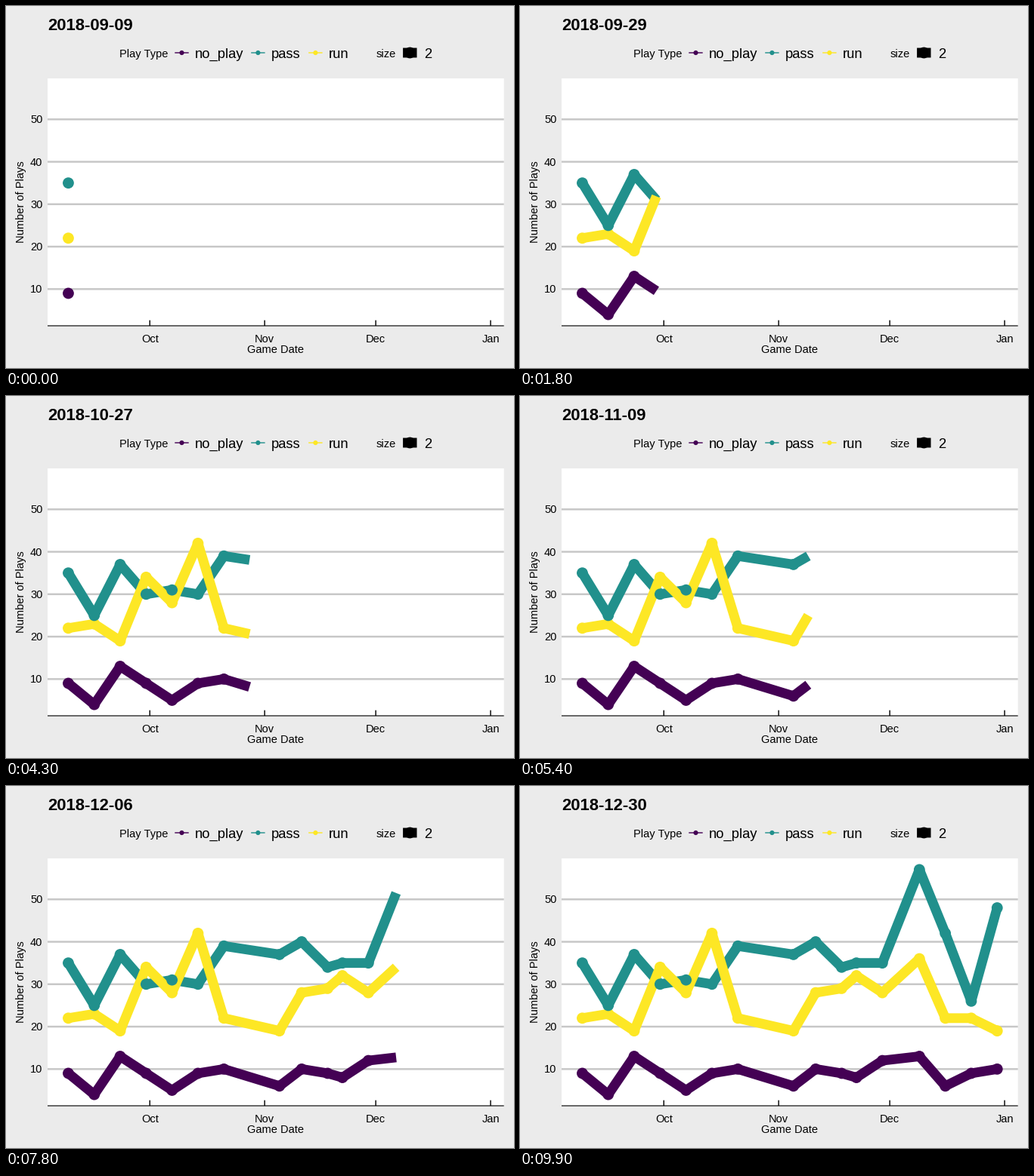
Write a matplotlib script that moves like this. It is 672x480 px and loops after 10 s.

```python
import numpy as np
import matplotlib.pyplot as plt
from matplotlib.animation import FuncAnimation
from matplotlib.patches import Circle, Rectangle

W, H, DPI = 672, 480, 96
FRAMES, INTERVAL = 100, 100
LEFT, RIGHT, TOP, BOTTOM = 55, 658.67, 96, 424
BASE = 14.67                # text size in pixels
LINE, DOT = 12.9, 7.4       # line width and dot radius in pixels

START, SPAN = np.datetime64("2018-09-09"), 112
DAYS = np.array([0, 7, 14, 21, 28, 35, 42, 57, 63, 70, 74, 81, 91, 98, 105, 112])
PLAYS = {
    "no_play": ("#440154", [9, 4, 13, 9, 5, 9, 10, 6, 10, 9, 8, 12, 13, 6, 9, 10]),
    "pass": ("#21908C", [35, 25, 37, 30, 31, 30, 39, 37, 40, 34, 35, 35, 57, 42, 26, 48]),
    "run": ("#FDE725", [22, 23, 19, 34, 28, 42, 22, 19, 28, 29, 32, 28, 36, 22, 22, 19]),
}
DOT_ORDER = {"no_play": 5, "run": 6, "pass": 7}
# each game is reached on a whole frame
ARRIVAL = np.round(DAYS * (FRAMES - 1) / SPAN)

plt.rcParams["font.family"] = "Liberation Sans"
plt.rcParams["path.snap"] = False


def px(v):
    """Pixels to points."""
    return v * 72 / DPI


def x_pos(day):
    return LEFT + (RIGHT - LEFT) * (np.asarray(day) / SPAN + 0.05) / 1.1


def y_pos(count):
    return BOTTOM - (BOTTOM - TOP) * (np.asarray(count) - 1.35) / 58.3


fig = plt.figure(figsize=(W / DPI, H / DPI), dpi=DPI, facecolor="#EBEBEB")
ax = fig.add_axes([0, 0, 1, 1])
ax.set_xlim(0, W)
ax.set_ylim(H, 0)
ax.axis("off")


def text(x, y, s, size=BASE, **kw):
    return ax.text(x, y, s, fontsize=px(size), color="black", va="baseline", **kw)


def line(xs, ys, width, color="black", z=2):
    return ax.plot(xs, ys, color=color, lw=px(width), zorder=z,
                   solid_capstyle="butt", solid_joinstyle="round")[0]


def dot(x, y, r, color, z=5):
    return ax.add_patch(Circle((x, y), r, fc=color, ec="none", zorder=z))


def draw_panel():
    ax.add_patch(Rectangle((LEFT, TOP), RIGHT - LEFT, BOTTOM - TOP,
                           fc="white", ec="none", zorder=0))
    for v in range(10, 60, 10):
        y = float(y_pos(v))
        line([LEFT, RIGHT], [y, y], 2.49, "#C7C7C7", 1)
        text(48.4, y + 5.1, str(v), ha="right")
    line([LEFT, RIGHT], [BOTTOM, BOTTOM], 1.14)
    for name, day in (("Oct", 22), ("Nov", 53), ("Dec", 83), ("Jan", 114)):
        x = float(x_pos(day))
        line([x, x], [BOTTOM, BOTTOM - 7.33], 1.42)
        text(x, 446, name, ha="center")
    mid = (LEFT + RIGHT) / 2
    text(mid, 460, "Game Date", ha="center")
    text(24, (TOP + BOTTOM) / 2, "Number of Plays", ha="center",
         rotation=90, rotation_mode="anchor")


def draw_legend(y=62):
    text(150.3, 68, "Play Type")
    for (name, (color, _)), x in zip(PLAYS.items(), (232.5, 333.4, 409.4)):
        line([x - 9.2, x + 9.2], [y, y], 1.42, color)
        dot(x, y, 3.08, color)
        text(x + 17.3, 69, name, 18.33)
    text(489.7, 68, "size")
    line([525.1, 543.5], [y, y], LINE)
    dot(534.3, y, DOT, "black")
    text(552.7, 69, "2", 18.33)


draw_panel()
draw_legend()
title = text(LEFT, 32, "", 22, weight="bold")

series = []
for name, (color, counts) in PLAYS.items():
    path = line([], [], LINE, color, 4)
    dots = [dot(x, y, DOT, color, DOT_ORDER[name])
            for x, y in zip(x_pos(DAYS), y_pos(counts))]
    series.append((path, dots, counts))


def update(i):
    title.set_text(str(START + i * SPAN // (FRAMES - 1)))
    past = ARRIVAL <= i
    tip_day = np.interp(i, ARRIVAL, DAYS)
    for path, dots, counts in series:
        tip = np.interp(i, ARRIVAL, counts)
        if i:
            path.set_data(x_pos(np.append(DAYS[past], tip_day)),
                          y_pos(np.append(np.array(counts)[past], tip)))
        else:
            path.set_data([], [])
        for d, shown in zip(dots, past):
            d.set_visible(bool(shown))
    return []


anim = FuncAnimation(fig, update, frames=FRAMES, interval=INTERVAL,
                     init_func=lambda: update(0), repeat=True, repeat_delay=0)
plt.show()
```
